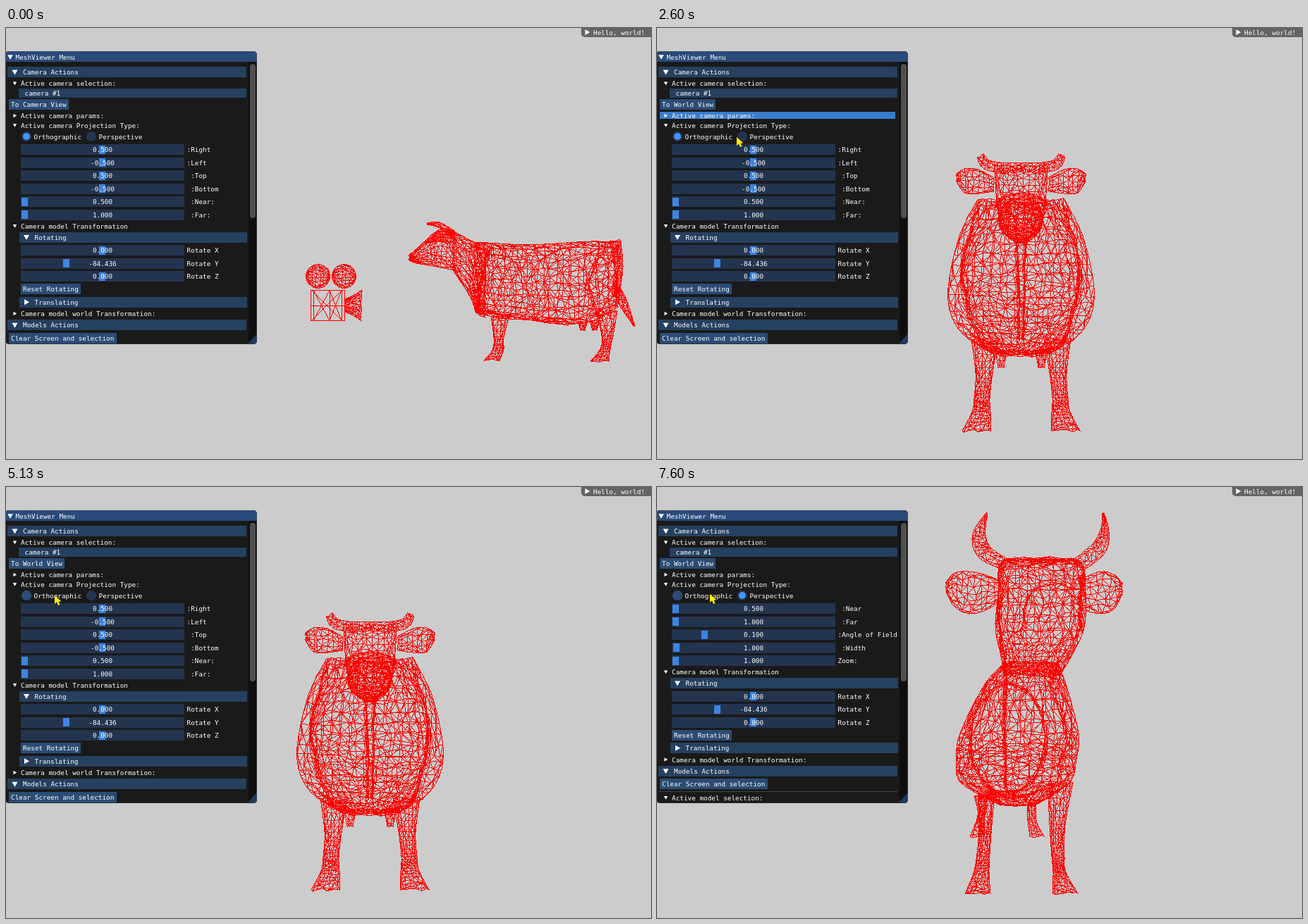
Write an HTML page with a canvas that moves like this. It is 915 px wide and 612 px high and loops after 8000 ms.

```html
<!DOCTYPE html>
<html lang="en">
<head>
<meta charset="utf-8">
<title>Mesh viewer</title>
<style>
html, body { margin: 0; width: 100%; height: 100%; overflow: hidden; background: #ccc; }
canvas { display: block; }
</style>
</head>
<body>
<canvas id="stage" width="915" height="612"></canvas>
<script>
const W = 915, H = 612, LOOP = 8000, TICK = 200 / 3;
const ctx = document.getElementById('stage').getContext('2d');

// ---------- wireframes ----------
const ACROSS = [1, 0], UP = [0, -1];
let seed = 7, pen;
const rnd = () => (seed = (seed * 16807) % 2147483647) / 2147483647;
const jit = a => (rnd() - 0.5) * a;

// Hard-edged one pixel line
function line(p, q) {
  const dx = q[0] - p[0], dy = q[1] - p[1];
  const n = Math.ceil(Math.max(Math.abs(dx), Math.abs(dy), 1));
  for (let i = 0; i <= n; i++)
    pen.fillRect(Math.floor(p[0] + dx * i / n), Math.floor(p[1] + dy * i / n), 1, 1);
}

// Smooth curve through a flat list of points with dim values each
function smooth(pts, dim) {
  const last = pts.length / dim - 1;
  return u => {
    const i = Math.max(0, Math.min(last - 1, Math.floor(u * last))), t = u * last - i;
    return Array.from({ length: dim }, (_, c) => {
      const [a, b, d, e] = [-1, 0, 1, 2].map(k => pts[dim * Math.max(0, Math.min(last, i + k)) + c]);
      return b + 0.5 * t * (d - a + t * (2 * a - 5 * b + 4 * d - e + t * (3 * (b - d) + e - a)));
    });
  };
}

// Triangle mesh between two edges, denser toward them
function patch(a, b, nu, nv) {
  const grid = [];
  for (let i = 0; i <= nu; i++) {
    const p = a(i / nu), q = b(i / nu), row = [];
    const wob = Math.min(8, Math.hypot(q[0] - p[0], q[1] - p[1]) / nv * 0.8);
    for (let j = 0; j <= nv; j++) {
      const f = j / nv, v = 0.35 * f + 0.65 * (1 - Math.cos(Math.PI * f)) / 2;
      const k = j % nv ? wob : 0;
      row.push([0, 1].map(c => p[c] + (q[c] - p[c]) * v + jit(k)));
    }
    grid.push(row);
  }
  for (let i = 0; i <= nu; i++) for (let j = 0; j <= nv; j++) {
    const p = grid[i][j], next = grid[i + 1];
    if (j < nv) line(p, grid[i][j + 1]);
    if (!next) continue;
    line(p, next[j]);
    if (j < nv) rnd() < 0.5 ? line(p, next[j + 1]) : line(grid[i][j + 1], next[j]);
  }
}

// Mesh around a spine of x, y, half width; slices follow dir or the normal
function sweep(pts, cell, dir) {
  const mid = smooth(pts, 3);
  let len = 0, wide = 0;
  for (let i = 0; i < pts.length; i += 3) {
    wide = Math.max(wide, pts[i + 2]);
    if (i) len += Math.hypot(pts[i] - pts[i - 3], pts[i + 1] - pts[i - 2]);
  }
  const edge = s => u => {
    const [x, y, r] = mid(u), p = mid(Math.max(0, u - 0.02)), q = mid(Math.min(1, u + 0.02));
    const d = Math.hypot(q[0] - p[0], q[1] - p[1]);
    const n = dir || [(p[1] - q[1]) / d, (q[0] - p[0]) / d];
    return [x + s * r * n[0], y + s * r * n[1]];
  };
  patch(edge(-1), edge(1), Math.max(2, Math.round(len / cell)), Math.max(3, Math.round(2 * wide / cell)));
}
function twin(pts, cell, dir) {
  sweep(pts, cell, dir);
  sweep(pts.map((v, i) => i % 3 ? v : 1033 - v), cell, dir);
}

// Bundle of loose strands along a curve
function strands(at, count, spread, n = 14) {
  for (let s = 0; s < count; s++) {
    let prev;
    for (let i = 0; i <= n; i++) {
      const p = at(i / n).map(v => v + jit(spread));
      if (prev) line(prev, p);
      prev = p;
    }
  }
}
const ring = (x, y, rx, ry, turn = 2) => u =>
  [x - rx * Math.cos(Math.PI * turn * u), y - ry * Math.sin(Math.PI * turn * u)];
const ball = (x, y, rx, ry, n) => patch(ring(x, y, rx, ry, 1), ring(x, y, rx, -ry, 1), n, n);

function sideView() {
  // film camera
  for (const x of [442.5, 479.5]) ball(x, 352.5, 17, 17, 9);
  for (const x of [432, 436, 459, 476, 480]) line([x, 372], [x, 415]);
  for (const y of [372, 394, 415]) line([432, y], [480, y]);
  for (const [x, z] of [[436, 459], [459, 476], [433, 476]]) {
    line([x, 372], [z, 415]);
    line([z, 372], [x, 415]);
  }
  sweep([480, 394, 9, 492, 394, 14, 504, 394, 22], 4, UP);

  // cow: head, neck, trunk
  sweep([572, 326, 4, 582, 324, 10, 600, 317, 20, 616, 313, 27, 636, 316, 28], 5, UP);
  sweep([597, 278, 1, 615, 280, 4, 636, 294, 6], 4, UP);
  sweep([596, 305, 1, 614, 296, 7, 634, 297, 8], 3.5, UP);
  sweep([634, 316, 28, 658, 341, 40, 668, 355, 50, 680, 359, 52], 5.5, UP);
  const trunk = [668, 354, 50, 700, 359, 53, 740, 361, 53, 780, 363, 57, 830, 360, 57, 868, 350, 46];
  sweep(trunk, 8, UP);
  sweep(trunk, 15, UP);
  strands(smooth([686, 312, 673, 355, 670, 404], 2), 6, 8);
  strands(smooth([668, 400, 710, 409, 800, 420], 2), 4, 5);
  strands(smooth([850, 306, 826, 362, 842, 412], 2), 4, 9);
  // rump, tail, legs, udder
  sweep([864, 302, 8, 869, 340, 6, 866, 378, 4], 4, ACROSS);
  sweep([867, 368, 4, 874, 388, 7, 891, 423, 1], 4, ACROSS);
  sweep([701, 409, 13, 699, 440, 7, 698, 457, 8, 689, 472, 11], 5, ACROSS);
  sweep([852, 402, 15, 853, 437, 8, 850, 456, 7, 842, 473, 13], 5, ACROSS);
  for (const x of [818, 835]) sweep([x, 416, 7, x, 429, 3], 3.5, ACROSS);
}

function frontView() {
  const x = 516.5;
  sweep([x, 244, 62, x, 300, 89, x, 380, 104, x, 430, 87, x, 462, 42], 10, ACROSS);
  sweep([x, 246, 48, x, 330, 83, x, 400, 78, x, 466, 30], 13, ACROSS);
  sweep([x, 196, 38, x, 240, 35, x, 285, 28, x, 305, 8], 6, ACROSS);
  ball(x, 270, 31, 28, 7);
  strands(ring(x, 270, 31, 30), 2, 5, 18);
  strands(ring(x, 252, 36, 16, 1), 5, 6, 10);
  strands(ring(x, 440, 62, -22, 1), 7, 7);
  for (const s of [-1, 1]) {
    strands(smooth([x + s * 60, 252, x + s * 83, 345, x + s * 62, 442], 2), 6, 8);
    strands(smooth([x + s * 5, 300, x + s * 3, 442], 2), 5, 5);
  }
  twin([459, 181, 5, 466, 193, 7, 486, 198, 7, x, 198, 6], 6);
  twin([425, 212, 5, 436, 217, 17, 456, 218, 17, 477, 222, 10], 6, UP);
  twin([465, 442, 19, 464, 490, 12, 461, 525, 11, 460, 545, 13, 453, 572, 20], 5.5, ACROSS);
  twin([488, 460, 8, 488, 482, 4], 5, ACROSS);
}

function closeView() {
  // horns, ears
  sweep([468, 37, 1, 457, 67, 9, 464, 92, 11, 494, 110, 8], 5.5);
  sweep([633, 37, 1, 635, 62, 6, 626, 88, 11, 596, 112, 10], 5.5);
  sweep([410, 142, 7, 422, 146, 24, 442, 150, 30, 464, 150, 26, 487, 148, 15], 8, UP);
  sweep([660, 144, 8, 648, 149, 25, 628, 150, 30, 604, 152, 22], 8, UP);
  // head
  const head = [545, 102, 47, 545, 112, 60, 546, 150, 62, 543, 200, 63, 538, 240, 50, 532, 266, 40];
  sweep(head, 8, ACROSS);
  sweep(head, 13, ACROSS);
  strands(smooth([516, 214, 527, 155, 560, 137, 594, 146], 2), 4, 5);
  strands(smooth([600, 128, 600, 165, 601, 205], 2), 7, 8);
  strands(smooth([488, 108, 484, 175, 494, 254], 2), 4, 5);
  strands(smooth([496, 104, 592, 104], 2), 4, 5);
  // trunk
  const trunk = [530, 250, 38, 522, 283, 59, 514, 350, 84, 510, 385, 85, 508, 420, 77, 512, 452, 25];
  sweep(trunk, 9, ACROSS);
  sweep(trunk, 14, ACROSS);
  strands(ring(498, 358, 54, 78), 6, 8, 26);
  strands(smooth([494, 252, 493, 340, 495, 428], 2), 8, 6);
  strands(smooth([566, 264, 560, 290, 580, 340, 570, 405], 2), 4, 8);
  strands(ring(508, 424, 38, -16, 1), 7, 8, 8);
  // legs
  sweep([467, 436, 12, 466, 480, 9, 463, 520, 9, 460, 548, 11, 455, 577, 18], 5.5, ACROSS);
  sweep([572, 420, 18, 568, 480, 11, 569, 525, 9, 571, 547, 9, 579, 577, 18], 5.5, ACROSS);
  sweep([459, 438, 9, 460, 466, 5, 454, 496, 10], 5, ACROSS);
  sweep([532, 450, 6, 532, 474, 6, 539, 496, 10], 5, ACROSS);
}

function bake(draw) {
  const c = document.createElement('canvas');
  c.width = W;
  c.height = H;
  pen = c.getContext('2d');
  pen.fillStyle = '#f00';
  draw();
  return c;
}
const views = [sideView, frontView, closeView].map(bake);

// ---------- interface ----------
const HEAD = '#264060', FRAME = '#23344f', BUTTON = '#2b4c74', GRAB = '#3d85e0', BRIGHT = '#4296fa';

function box(x, y, w, h, color, r = 0) {
  ctx.fillStyle = color;
  ctx.beginPath();
  ctx.roundRect(Math.round(x), Math.round(y), Math.round(w), Math.round(h), r);
  ctx.fill();
}
function poly(color, ...p) {
  ctx.fillStyle = color;
  ctx.beginPath();
  for (let i = 0; i < p.length; i += 2) ctx.lineTo(p[i], p[i + 1]);
  ctx.fill();
}
function disc(x, y, r, color) {
  ctx.fillStyle = color;
  ctx.beginPath();
  ctx.arc(x, y, r, 0, 7);
  ctx.fill();
}
function text(s, x, y, align = 'left') {
  ctx.fillStyle = '#fff';
  ctx.textAlign = align;
  ctx.fillText(s, x, y + 3.5);
}
function arrow(x, y, r, open) {
  if (open) poly('#fff', x - r, y - r * 0.75, x + r, y - r * 0.75, x, y + r);
  else poly('#fff', x - r * 0.75, y - r, x + r, y, x - r * 0.75, y + r);
}
function header(s, x, y, open = true) {
  box(x, y - 7.5, 341 - x, 15, HEAD);
  arrow(x + 10.5, y, 4, open);
  text(s, x + 22, y);
}
function node(s, y, open) {
  arrow(12.5, y, 2.7, open);
  text(s, 21, y);
}
function button(s, x, y, color = BUTTON) {
  box(x, y - 7.5, s.length * 5.65 + 6, 15, color);
  text(s, x + 3, y);
}
function slider(value, label, y, grab = 136.5) {
  box(21, y - 7.5, 232, 15, FRAME);
  box(grab - 4.4, y - 6, 9, 12, GRAB);
  text(value, 137, y, 'center');
  text(label, 256.5, y);
}
function radio(s, x, level, on) {
  disc(x, 154, 7.2, [FRAME, BUTTON, '#356db0'][level]);
  if (on) disc(x, 154, 5, BRIGHT);
  text(s, x + 10.5, 154);
}

const LOW = 26.5;
const ortho = [
  ['0.500', ':Right'], ['-0.500', ':Left'], ['0.500', ' :Top'],
  ['-0.500', ' :Bottom'], ['0.500', ' :Near:', LOW], ['1.000', ' :Far:', LOW]
];
const persp = [
  ['0.500', ' :Near', LOW], ['1.000', ' :Far', LOW], ['0.100', ':Angle of Field', 67.5],
  ['1.000', ' :Width', LOW + 1], ['1.000', 'Zoom:', LOW]
];

function panel(s) {
  ctx.save();
  ctx.beginPath();
  ctx.roundRect(-1, 33, 357, 416, 5);
  ctx.clip();
  box(-1, 33, 357, 416, '#1a1a1a');
  box(-1, 33, 357, 15, '#294a7a');
  box(344, 48, 12, 401, '#0f0f0f');
  box(346, 51, 8, s.bar - 51, '#4f4f4f', 4);
  poly('#1e3a5c', 356, 434, 356, 448, 343, 448);
  arrow(6, 41, 3.8, true);
  text('MeshViewer Menu', 13.5, 41);

  header('Camera Actions', 2, 62.5);
  node('Active camera selection:', 78.5, true);
  box(18, 86, 323, 13, HEAD);
  text('camera #1', 26.5, 92.5);
  button(s.cam ? 'To World View' : 'To Camera View', 4, 108.5, s.button);
  if (s.params) box(4, 119, 334, 10, '#3a7dcd');
  node('Active camera params:', 124.5, false);
  node('Active camera Projection Type:', 138, true);
  radio('Orthographic', 29, s.radios[0], s.checked === 0);
  radio('Perspective', 121, s.radios[1], s.checked === 1);

  (s.persp ? persp : ortho).forEach((r, i) => slider(r[0], r[1], 172.5 + i * 18.5, r[2]));

  const up = s.persp ? 18.5 : 0;
  node('Camera model Transformation', 281 - up, true);
  header('Rotating', 18.5, 297 - up);
  slider('0.000', 'Rotate X', 315.5 - up);
  slider('-84.436', 'Rotate Y', 334 - up, 85);
  slider('0.000', 'Rotate Z', 352.5 - up);
  button('Reset Rotating', 21, 370.8 - up);
  header('Translating', 18.5, 389.3 - up, false);
  node('Camera model world Transformation:', 405.5 - up, false);
  header('Models Actions', 2, 421.7 - up);
  button('Clear Screen and selection', 4, 440 - up);
  if (s.persp) {
    box(2, 432, 339, 1, '#44444d');
    node('Active model selection:', 441, true);
  }
  ctx.restore();
  ctx.strokeStyle = 'rgba(60,66,82,.6)';
  ctx.lineWidth = 1;
  ctx.beginPath();
  ctx.roundRect(-1, 33.5, 356.5, 415, 5);
  ctx.stroke();
}

// ---------- timeline, in ticks ----------
// pointer moves: start, end, x, y
const moves = [
  [4, 16, 245, 214], [16, 22, 49, 110], [36, 39, 113, 155], [39, 41, 121, 157],
  [56, 62, 69, 154], [78, 86, 121, 152], [105, 114, 75, 152]
];
// clicks: press, new picture, widgets settled
const clicks = [[33, 35, 36], [52, 54, 56], [75, 77, 79], [100, 101, 103]];

function pointer(k) {
  let x = 905, y = 603;
  for (const [from, to, mx, my] of moves) {
    const t = Math.max(0, Math.min(1, (k - from) / (to - from))), e = t * t * (3 - 2 * t);
    x += (mx - x) * e;
    y += (my - y) * e;
  }
  return [Math.round(x), Math.round(y)];
}

function state(k) {
  const [x, y] = pointer(k - 2); // widgets lag behind the pointer
  const over = (a, b, c, d) => k >= clicks[0][0] && x >= a && x < b && y >= c && y < d;
  const level = hit => hit ? clicks.some(c => k >= c[0] && k < c[1]) ? 2 : 1 : 0;
  const count = i => clicks.filter(c => k >= c[i]).length;
  const isPersp = n => n > 0 && n % 2 === 0;
  const shown = isPersp(count(1)), settled = isPersp(count(2));
  return {
    cam: count(1) > 0,
    persp: shown,
    button: [BUTTON, BRIGHT, '#0f87fa'][level(over(4, 89, 101, 116))],
    params: over(4, 338, 118, 131),
    radios: [level(over(22, 114, 147, 162)), level(over(114, 194, 147, 162))],
    checked: settled ? (shown ? 1 : -1) : 0,
    bar: settled ? 276 : 270
  };
}

function draw(ms) {
  const k = Math.floor((ms % LOOP + 3.4) / TICK), s = state(k);
  ctx.fillStyle = '#ccc';
  ctx.fillRect(0, 0, W, H);
  ctx.drawImage(views[s.cam ? s.persp ? 2 : 1 : 0], 0, 0);
  ctx.font = '9.35px "DejaVu Sans Mono", monospace';
  panel(s);
  box(816, -6, 110, 19, '#646464', 5);
  arrow(824.5, 6, 4, false);
  text('Hello, world!', 833, 6.5);
  if (k < moves[0][0]) return;
  ctx.save();
  ctx.translate(...pointer(k));
  poly('#ffec00', 0, 0, 0, 12, 3, 9.5, 5, 14, 7.5, 13, 5.5, 8.7, 9.5, 8.5);
  ctx.restore();
}

const start = performance.now();
function loop() {
  draw(performance.now() - start);
  requestAnimationFrame(loop);
}
loop();
</script>
</body>
</html>
```
